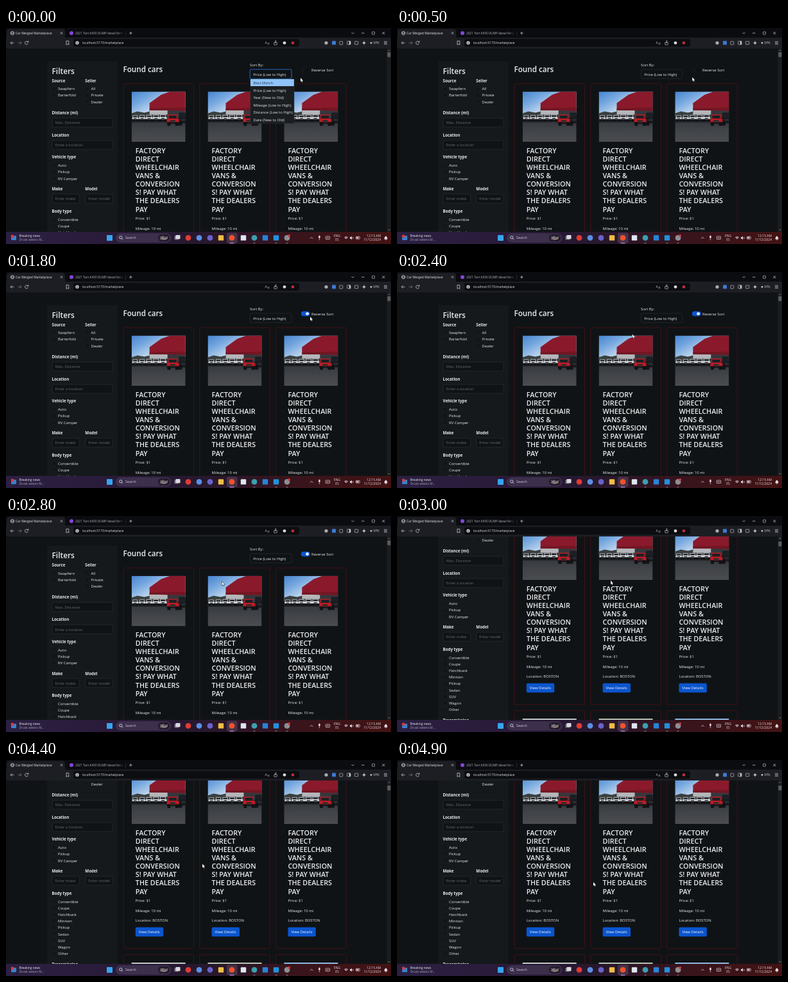
Write an HTML page with a canvas that moves like this. It is 600 by 338 pixels and loops after 5000 ms.

```html
<!DOCTYPE html>
<html lang="en">
<head>
<meta charset="utf-8">
<title>Car Merged Marketplace</title>
<style>
html, body { margin: 0; width: 100%; height: 100%; overflow: hidden; background: #101315; }
canvas { display: block; width: 600px; height: 338px; }
</style>
</head>
<body>
<canvas id="stage"></canvas>
<script>
const W = 600, H = 338, LOOP = 5000, STEP = 100;
const PAGE_TOP = 32, PAGE_BOTTOM = 319;
const BODY = 5.9, LABEL = 6.2;
const canvas = document.getElementById('stage');
const ctx = canvas.getContext('2d');
const dpr = window.devicePixelRatio || 1;
canvas.width = W * dpr;
canvas.height = H * dpr;

const C = {
  page: '#101315', panel: '#15191b', text: '#e9ebed', dim: '#666b70',
  line: '#2a2e32', card: '#561019', blue: '#0b55cd', strip: '#0b0c10',
  bar: '#1d1e24', field: '#0c0d11', icon: '#c3c4cb'
};

// ---- drawing helpers ----
function rect(x, y, w, h, fill) {
  ctx.fillStyle = fill;
  ctx.fillRect(x, y, w, h);
}
function box(x, y, w, h, r, fill, stroke, lw = 0.7) {
  ctx.beginPath();
  ctx.roundRect(x, y, w, h, r);
  if (fill) { ctx.fillStyle = fill; ctx.fill(); }
  if (stroke) { ctx.strokeStyle = stroke; ctx.lineWidth = lw; ctx.stroke(); }
}
function dot(x, y, r, fill) {
  ctx.beginPath();
  ctx.arc(x, y, r, 0, Math.PI * 2);
  ctx.fillStyle = fill;
  ctx.fill();
}
function ring(x, y, r, color, a = 0, b = Math.PI * 2) {
  ctx.beginPath();
  ctx.arc(x, y, r, a, b);
  ctx.strokeStyle = color;
  ctx.lineWidth = 0.8;
  ctx.stroke();
}
function trace(pts) {
  ctx.beginPath();
  for (let i = 0; i < pts.length; i += 2) ctx.lineTo(pts[i], pts[i + 1]);
}
function poly(fill, ...pts) {
  trace(pts);
  ctx.closePath();
  ctx.fillStyle = fill;
  ctx.fill();
}
function line(color, ...pts) {
  trace(pts);
  ctx.strokeStyle = color;
  ctx.lineWidth = 0.8;
  ctx.stroke();
}
function gradient(x0, y0, x1, y1, ...colors) {
  const g = ctx.createLinearGradient(x0, y0, x1, y1);
  colors.forEach((c, i) => g.addColorStop(i / (colors.length - 1), c));
  return g;
}
function text(s, x, y, size = BODY, color = C.text, weight = 500, align = 'left') {
  ctx.font = `${weight} ${size}px "Open Sans", "Noto Sans", sans-serif`;
  ctx.textAlign = align;
  ctx.fillStyle = color;
  ctx.fillText(s, x, y);
}
function clipped(x, y, w, h, draw) {
  ctx.save();
  ctx.beginPath();
  ctx.rect(x, y, w, h);
  ctx.clip();
  draw();
  ctx.restore();
}

// ---- motion ----
const smooth = (t, a, b) => {
  const p = Math.min(1, Math.max(0, (t - a) / (b - a)));
  return p * p * (3 - 2 * p);
};
const PATH = [
  [0, 459, 78], [400, 459, 78], [1000, 475, 66], [1400, 474, 70], [1900, 474, 70],
  [2600, 340, 104], [3000, 333, 101], [3800, 306, 125], [4900, 306, 191]
];
function pointer(t) {
  let i = 0;
  while (i < PATH.length - 2 && t >= PATH[i + 1][0]) i++;
  const [t0, x0, y0] = PATH[i], [t1, x1, y1] = PATH[i + 1];
  const p = smooth(t, t0, t1);
  return [x0 + (x1 - x0) * p, y0 + (y1 - y0) * p];
}

// ---- filter panel ----
function label(s, x, y) { text(s, x, y, LABEL, C.text, 700); }
function options(names, x, y) {
  names.forEach((name, i) => {
    const base = y + i * 10.15;
    box(x, base - 5, 5.4, 5.4, 1.2, '#111416', '#1f2326', 0.6);
    text(name, x + 9, base);
  });
}
function input(x, y, w, hint) {
  box(x, y, w, 14, 2, '#101315', C.line);
  clipped(x, y, w - 4, 14, () => text(hint, x + 4.7, y + 9.3, BODY, C.dim));
}
function filters() {
  rect(64, 52, 110, 700, C.panel);
  text('Filters', 71.5, 71.8, 11.9, C.text, 600);
  label('Source', 71.5, 85);
  options(['Swapfern', 'Barterfold'], 72, 97.3);
  label('Seller', 123.3, 85);
  options(['All', 'Private', 'Dealer'], 123.6, 97.3);
  label('Distance (mi)', 71.5, 135.2);
  input(72, 141, 94, 'Max. Distance');
  label('Location', 71.5, 170);
  input(72, 176, 94, 'Enter a location');
  label('Vehicle type', 71.5, 204.3);
  options(['Auto', 'Pickup', 'RV Camper'], 72, 217.3);
  label('Make', 71.5, 254.4);
  input(72, 260, 42.5, 'Enter make');
  label('Model', 123.3, 254.4);
  input(123.5, 260, 42.5, 'Enter model');
  label('Body type', 71.5, 289.2);
  options(['Convertible', 'Coupe', 'Hatchback', 'Minivan', 'Pickup', 'Sedan', 'SUV', 'Wagon', 'Other'], 72, 301.8);
  label('Transmission', 71.5, 400);
}

// ---- listings ----
function jeep(x, y, s, body) {
  ctx.save();
  ctx.translate(x, y);
  ctx.scale(s, s);
  rect(1, 0, 9, 5, body);
  rect(1.8, 0.9, 7.4, 2.8, '#1c1f24');
  rect(0, 4, 11.5, 3.4, body);
  rect(3, 5.2, 5, 1.6, '#2a2d32');
  rect(0, 7.2, 11.5, 1.6, '#17191c');
  rect(0.5, 7.2, 3, 3.4, '#101214');
  rect(8, 7.2, 3, 3.4, '#101214');
  ctx.restore();
}
function photo(x, y) {
  clipped(x, y, 84, 78.5, () => {
    ctx.translate(x, y);
    rect(0, 0, 84, 40, gradient(0, 0, 20, 36, '#4584cf', '#78a9e0', '#c4d9ee'));
    poly('#3a403f', 0, 34, 9, 31, 20, 33, 32, 30, 32, 46, 0, 46);
    rect(28, 28, 56, 20, '#36373c');
    poly('#b4b6ba', 28, 29, 56, 29, 56, 36, 28, 36);
    poly('#8a1a2b', 28, 18, 46, 5, 60, 0, 84, 0, 84, 30, 28, 29);
    poly('#741624', 28, 26, 84, 25, 84, 30, 28, 29);
    rect(0, 44, 84, 35, gradient(0, 44, 0, 78, '#33363a', '#414448', '#4a4c4f'));
    rect(0, 42, 84, 6, '#1c1e22');
    for (let i = 0; i < 5; i++) jeep(1 + i * 10.6, 37.2 - i * 0.3, 0.84 + i * 0.04, '#d4d6da');
    jeep(72, 33, 1.9, '#191b1f');
    jeep(55, 36, 1.65, '#bd1c25');
  });
}
const TITLE = ['FACTORY', 'DIRECT', 'WHEELCHAIR', 'VANS &', 'CONVERSION', 'S! PAY WHAT', 'THE DEALERS', 'PAY'];
function card(x, nextTone) {
  box(x, 87, 109.5, 286, 2, null, C.card);
  photo(x + 12.7, 99.5);
  const tx = x + 18.8;
  TITLE.forEach((s, i) => text(s, tx, 195.5 + i * 13.15, 10.75, C.text, 600));
  text('Price: $1', tx, 299.9);
  text('Mileage: 10 mi', tx, 315.5);
  text('Location: BOSTON', tx, 330.9);
  box(tx, 339.8, 43.4, 14.4, 2, C.blue);
  text('View Details', tx + 5, 349.2, BODY, '#f4f7fb');
  box(x, 382.7, 109.5, 286, 2, null, C.card);
  rect(x + 12.7, 395, 84, 78, nextTone);
}

// ---- sorting controls ----
const SORTS = ['Best Match', 'Price (Low to High)', 'Year (New to Old)', 'Mileage (Low to High)',
  'Distance (Low to High)', 'Date (New to Old)'];
function sorting(open, on) {
  text('Sort By:', 380, 59.5);
  if (open) box(380.3, 64.8, 64.6, 14.4, 2.4, null, '#0c3a80', 1.8);
  box(380.3, 64.8, 64.6, 14.4, 2, '#101315', open ? '#2f6fc4' : C.line);
  text(SORTS[1], 385.3, 74.5);
  const knob = 463.8 + 5.8 * on;
  box(460, 61.8, 13.6, 7, 3.5, on ? C.blue : '#0d0f11', on ? C.blue : '#191c1f');
  dot(knob, 65.3, 2.4, on ? '#f2f5fa' : '#16191b');
  text('Reverse Sort', 476, 67.8);
}
function menu() {
  box(380.8, 79.8, 68.2, 69.4, 1, '#1b1e21', '#33383d', 0.5);
  rect(381, 80, 67.8, 11, '#8fc3fa');
  SORTS.forEach((s, i) => text(s, 385.5, 88.2 + i * 11.55, BODY, i ? '#e3e5e8' : '#24384f'));
}

// ---- browser frame ----
function cross(x, y, r) {
  line(C.icon, x - r, y - r, x + r, y + r);
  line(C.icon, x - r, y + r, x + r, y - r);
}
function browser() {
  rect(0, 0, W, 16, C.strip);
  box(1, 1.5, 91, 17, 4, C.bar);
  rect(0, 15, W, 17, C.bar);
  ring(10, 8, 2.6, '#e4e5e8');
  line('#e4e5e8', 7.4, 8, 12.6, 8);
  text('Car Merged Marketplace', 15, 9.9, 4.95, '#e7e8eb');
  cross(86.5, 8, 1.7);
  dot(102, 8, 3, '#8446d8');
  clipped(107, 0, 76, 16, () => text('2021 Tarn K430 DUMP diesel for sale', 108, 9.9, 4.7, '#b4b5bd'));
  rect(178, 2, 5, 12, gradient(178, 0, 183, 0, 'rgba(11,12,16,0)', C.strip));
  rect(186, 5, 0.6, 7, '#3b3c45');
  line(C.icon, 192, 8, 196.6, 8);
  line(C.icon, 194.3, 5.7, 194.3, 10.3);
  line(C.icon, 538.5, 7, 540.5, 9, 542.5, 7);
  line(C.icon, 554, 8, 558.5, 8);
  box(570.5, 6, 4, 4, 0.6, null, C.icon);
  cross(588.3, 8, 2);

  line(C.icon, 12.5, 23.3, 7, 23.3);
  line(C.icon, 9.4, 20.9, 7, 23.3, 9.4, 25.7);
  line('#777982', 18.5, 23.3, 24, 23.3);
  line('#777982', 21.6, 20.9, 24, 23.3, 21.6, 25.7);
  ring(32, 23.3, 2.5, C.icon, 0.3, 5.4);
  poly(C.icon, 32.6, 22.4, 35.2, 22.4, 35.2, 19.8);
  line(C.icon, 94, 20.4, 97.8, 20.4, 97.8, 26.4, 95.9, 24.9, 94, 26.4, 94, 20);
  box(105, 17.3, 352, 12, 3, C.field);
  dot(111, 23.3, 2.7, C.icon);
  rect(110.6, 22.2, 0.8, 2.6, C.field);
  text('localhost:5173/marketplace', 119, 25.1, 5, '#e0e1e5');
  text('A', 403.5, 25, 5, C.icon);
  text('文', 407, 26, 4, C.icon);
  box(417.7, 22.5, 4.6, 3.8, 0.5, null, C.icon);
  line(C.icon, 420, 24, 420, 19.6, 421.6, 21.2);
  dot(434, 23.3, 2.4, '#dcd6d8');
  dot(447, 23.3, 2.2, '#c8303c');

  dot(499, 23.3, 2.6, '#a9abb2');
  box(508, 20.3, 6, 6, 1, '#3d78d4');
  box(519.8, 21, 5, 5, 1.2, null, C.icon);
  box(531.6, 20.7, 5.4, 5.2, 0.8, null, C.icon);
  rect(534.7, 20.7, 2.3, 5.2, C.icon);
  box(543.4, 21, 5.4, 4.6, 0.8, null, C.icon);
  poly(C.icon, 558, 20, 559, 22.4, 561.2, 23.3, 559, 24.2, 558, 26.6, 557, 24.2, 554.8, 23.3, 557, 22.4);
  dot(569, 23.3, 1.4, C.icon);
  text('VPN', 572.3, 25.1, 4.8, C.icon);
  for (let i = -1; i < 2; i++) line(C.icon, 589, 23.3 + i * 2, 594, 23.3 + i * 2);
}
function scrollbar(scroll) {
  rect(593.5, PAGE_TOP, 6.5, PAGE_BOTTOM - PAGE_TOP, '#1a1d1f');
  poly('#5c6064', 595, 36, 596.8, 33.8, 598.6, 36);
  poly('#5c6064', 595, 315, 596.8, 317.2, 598.6, 315);
  box(594.3, 38 + scroll * 0.025, 5, 7.5, 1, '#585c60');
}

// ---- taskbar ----
const APPS = [
  [284, 'dot', '#df3b35'], [301, 'dot', '#5b8fe0'], [318, 'dot', '#6a63c9'],
  [335, 'box', '#f0bd45'], [352, 'dot', '#f0522d'], [370, 'box', '#dfe5ee'],
  [387, 'dot', '#3c9fae'], [404, 'box', '#2a82d9'], [421, 'box', '#2390dc'], [438, 'dot', '#8d8f95']
];
function taskbar() {
  rect(0, PAGE_BOTTOM, W, H - PAGE_BOTTOM,
    gradient(0, 0, W, 0, '#2b2042', '#2a1b3a', '#26182e', '#38141c', '#431313'));
  box(8, 325, 8, 7, 1, '#3c7fc8');
  dot(10, 325.8, 2.4, '#dc3a3c');
  text('Breaking news', 20.5, 326.6, 4.85, '#eeeaf2');
  text('Drusk selects M...', 20.5, 333.3, 4.8, '#aaa2b5');
  box(157, 324, 9, 9, 1, '#36a4ee');
  box(171.5, 321.8, 85.5, 13.4, 6.7, '#3b2f4c', '#4a3e58', 0.5);
  ring(178.8, 327.7, 2.1, '#ece8f0');
  line('#ece8f0', 180.3, 329.2, 182.2, 331.1);
  text('Search', 186, 330.4, 5.3, '#d2ccd9');
  box(237, 323, 18, 11, 5, '#201b2c');
  poly('#6f6776', 239, 330, 244, 325, 248, 327, 253, 326, 250, 331, 244, 332);
  line('#c8a672', 240, 326, 247, 331, 252, 329);
  box(262.5, 325.3, 6.6, 6, 0.8, '#787681');
  box(264.5, 324, 7, 6.2, 0.8, '#d9d8de');
  box(344, 320.5, 16.5, 16, 2.5, '#433349');
  for (const [x, kind, color] of APPS) {
    if (kind === 'dot') dot(x, 328.4, 4.4, color);
    else box(x - 4.2, 324.2, 8.4, 8.4, 1.2, color);
  }
  dot(441, 325, 2, '#d33c3c');
  box(348.5, 336, 7, 1, 0.5, '#cf9df0');
  for (const x of [387, 421, 438]) box(x - 1.5, 336, 3, 0.9, 0.4, '#8b8393');

  const pale = '#e4dfe9';
  line(pale, 474, 329.5, 476.2, 327.3, 478.4, 329.5);
  box(487.2, 324.8, 2.4, 4.4, 1.2, pale);
  line(pale, 488.4, 330, 488.4, 332);
  box(498.2, 326, 6.4, 4.6, 0.8, null, pale);
  line(pale, 499.5, 328.3, 503.3, 328.3);
  text('ENG', 516, 326.6, 4.9, pale, 500, 'center');
  text('ES', 516, 333.3, 4.9, pale, 500, 'center');
  for (const r of [1.4, 2.7, 4]) ring(530, 330.7, r, pale, Math.PI * 1.25, Math.PI * 1.75);
  poly(pale, 536, 327.3, 537.4, 327.3, 539, 325.8, 539, 331.2, 537.4, 329.7, 536, 329.7);
  ring(539, 328.5, 2, pale, -0.8, 0.8);
  box(545.3, 326.4, 6, 3.8, 0.8, null, pale);
  rect(546.2, 327.3, 3.4, 2, pale);
  text('12:15 AM', 584, 326.6, 5, pale, 500, 'right');
  text('11/12/2024', 584, 333.3, 5, pale, 500, 'right');
  poly(pale, 589.4, 330.4, 590.3, 327, 592, 325.4, 593.7, 327, 594.6, 330.4);
  dot(592, 331.2, 0.8, pale);
}

function cursor(x, y) {
  trace([x, y, x, y + 6, x + 1.4, y + 4.8, x + 2.4, y + 7, x + 3.3, y + 6.6, x + 2.4, y + 4.5, x + 4.2, y + 4.4]);
  ctx.closePath();
  ctx.fillStyle = '#f6f6f6';
  ctx.strokeStyle = '#08090a';
  ctx.lineWidth = 0.9;
  ctx.stroke();
  ctx.fill();
}

function draw(t) {
  const scroll = 78 * smooth(t, 2760, 3000);
  const open = t < 400;
  ctx.setTransform(dpr, 0, 0, dpr, 0, 0);
  rect(0, 0, W, H, C.page);
  clipped(0, PAGE_TOP, 593.5, PAGE_BOTTOM - PAGE_TOP, () => {
    ctx.translate(0, -scroll);
    filters();
    text('Found cars', 182.5, 69.2, 11.7, C.text, 600);
    ['#c6c8c9', '#b9c4b4', '#8fb9e2'].forEach((tone, i) => card(183 + i * 118.8, tone));
    sorting(open, smooth(t, 1350, 1500));
    if (open) menu();
  });
  scrollbar(scroll);
  browser();
  taskbar();
  cursor(...pointer(t));
}

let shown = -1;
function tick() {
  const t = Math.floor((performance.now() % LOOP) / STEP) * STEP;
  if (t !== shown) draw(shown = t);
  requestAnimationFrame(tick);
}
tick();
</script>
</body>
</html>
```
